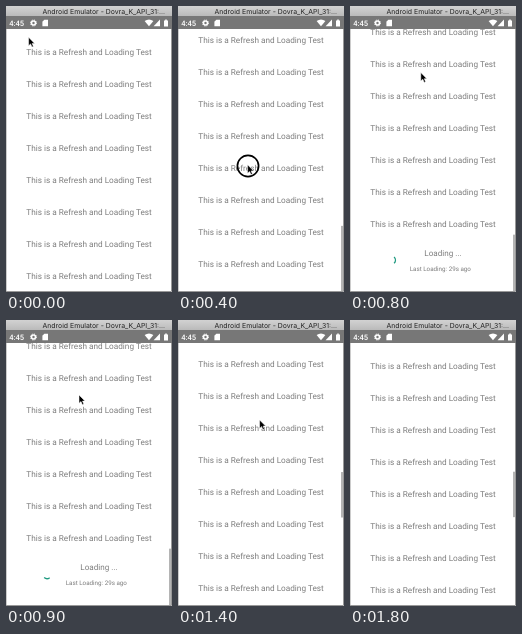
Write an HTML page that moves like this. It is 166 by 286 pixels and loops after 2000 ms.

```html
<!DOCTYPE html>
<html lang="en">
<head>
<meta charset="utf-8">
<title>Refresh and loading list</title>
<style>
  html, body { margin: 0; width: 100%; height: 100%; overflow: hidden; background: #fff; }
  svg { display: block; width: 166px; height: 286px; }
  text { font-family: Roboto, sans-serif; text-anchor: middle; fill: #7d7d7d; text-rendering: geometricPrecision; }
  .row { font-size: 8.22px; }
  .state { font-size: 8.1px; }
  .note { font-size: 6.25px; }
  .title { font: 6.9px Inter, sans-serif; fill: #222; }
  .clock { font-size: 7.6px; font-weight: 500; fill: #fff; }
</style>
</head>
<body>
<svg viewBox="0 0 166 286">
  <defs>
    <linearGradient id="chrome" x2="0" y2="1">
      <stop offset="0" stop-color="#d2d2d2"/>
      <stop offset="1" stop-color="#bababa"/>
    </linearGradient>
  </defs>
  <rect width="166" height="286" fill="#fff"/>
  <g id="rows"></g>
  <g id="footer">
    <text id="state" class="state" y="3"></text>
    <text id="note" class="note" x="90.3" y="17.4"></text>
    <path id="arrow" d="M42 0V12.8M38.5 9.3L42 12.8L45.5 9.3" fill="none" stroke="#777" stroke-width=".9"/>
    <path id="spinner" fill="none" stroke-width="1.4"/>
  </g>
  <rect id="thumb" x="163" width="2" fill="#b4b4b4"/>
  <path d="M.25 23V286" stroke="#777" stroke-width=".5"/>
  <path d="M165.5 23V285.5H0" fill="none" stroke="#999"/>

  <rect width="166" height="10" fill="url(#chrome)"/>
  <text class="title" x="97.8" y="7.6">Android Emulator - Dovra_K_API_31:...</text>
  <rect y="10" width="166" height="13" fill="#777"/>
  <text class="clock" x="10.7" y="19.8">4:45</text>
  <g fill="#fff">
    <circle cx="27.5" cy="17" r="2" fill="none" stroke="#fff" stroke-width="1.6"/>
    <circle cx="27.5" cy="17" r="3" fill="none" stroke="#fff" stroke-width="1" stroke-dasharray="1.2 1.156"/>
    <path d="M38.3 13.8H42V20.2H36.4V15.8Z"/>
    <path d="M138.6 15Q143 11.8 147.4 15L143 20.3Z"/>
    <path d="M154 13.6V20.3H147.6Z"/>
    <path d="M158 14.4H159.2V13.5H160.8V14.4H162V20.4H158Z"/>
  </g>

  <g id="pointer">
    <circle id="press" cx=".4" cy="1.2" r="10.6" fill="none" stroke="#000" stroke-width="1.7"/>
    <path d="M0 0V8.4L2 6.6L3.4 9.8L4.8 9.1L3.5 6.1H6Z" fill="#000" stroke="#fff" stroke-width=".5"/>
  </g>
</svg>
<script>
const $ = id => document.getElementById(id);
const LOOP = 2000, STEP = 100, LAST_STEP = 18;
const PITCH = 32, FIRST_Y = 46, TOP = 24, VIEW = 262;
const END = 736, COUNT = 31, ADDED = 16;

// Keys: [step, value...]
const scrollKeys = [[0, 0], [1, 0], [2, 420], [3, END], [4, 748], [5, 778], [6, 808],
  [7, 794], [8, 788], [11, 788], [12, 777], [13, 745], [14, 738], [15, END]];
const pointerKeys = [[0, 22.6, 31.3], [2, 55, 185], [3, 66, 195], [4, 69.6, 158.8],
  [6, 75.6, 57.3], [8, 70.8, 66.6], [12, 79.6, 100], [15, 82.6, 100]];

function at(keys, step, field = 1) {
  const i = keys.findIndex(k => k[0] >= step);
  if (i < 0) return keys[keys.length - 1][field];
  if (i === 0) return keys[0][field];
  const a = keys[i - 1], b = keys[i];
  return a[field] + (b[field] - a[field]) * (step - a[0]) / (b[0] - a[0]);
}

const show = (el, on) => el.setAttribute("visibility", on ? "visible" : "hidden");

function arc(cx, cy, r, from, to) {
  const point = deg => {
    const a = deg * Math.PI / 180;
    return `${cx + r * Math.cos(a)} ${cy + r * Math.sin(a)}`;
  };
  return `M${point(from)}A${r} ${r} 0 0 1 ${point(to)}`;
}

const rows = Array.from({ length: 9 }, () => {
  const t = document.createElementNS("http://www.w3.org/2000/svg", "text");
  t.setAttribute("class", "row");
  t.setAttribute("x", 83);
  t.textContent = "This is a Refresh and Loading Test";
  return $("rows").appendChild(t);
});

function drawList(scroll, count) {
  const first = Math.floor(scroll / PITCH);
  rows.forEach((row, i) => {
    const n = first + i;
    row.setAttribute("y", FIRST_Y + 3 + n * PITCH - scroll);
    show(row, n < count);
  });
}

function drawFooter(step, scroll) {
  const loading = step >= 7;
  const y = FIRST_Y + (COUNT - 1) * PITCH - scroll + 29.2;
  show($("footer"), step < 13 && y < 286);
  $("footer").setAttribute("transform", `translate(0 ${y})`);
  $("state").textContent = loading ? "Loading ..." : "Release to load";
  $("state").setAttribute("x", loading ? 93 : 92);
  $("note").textContent = `Last Loading: ${step < 8 ? 28 : 29}s ago`;
  $("arrow").style.display = loading ? "none" : "";
  $("spinner").style.display = loading ? "" : "none";
  const fade = Math.max(0, Math.min(1, (step - 8) / 4));
  const turn = (step - 8) * 90;
  $("spinner").setAttribute("d", arc(41, 7, 4.4, turn - 45 + 30 * fade, turn + 45 - 20 * fade));
  $("spinner").setAttribute("stroke", step < 12 ? "#1f9a80" : "#44504d");
}

function drawThumb(step, scroll, count) {
  const content = END + VIEW + (count - COUNT) * PITCH;
  const over = count > COUNT ? 0 : Math.max(0, scroll - END);
  const height = VIEW * VIEW / content - over * 0.22;
  const y = Math.min(TOP + scroll * VIEW / content, TOP + VIEW - height);
  $("thumb").setAttribute("y", y);
  $("thumb").setAttribute("height", height);
  show($("thumb"), step >= 2);
}

function drawPointer(step) {
  const x = at(pointerKeys, step), y = at(pointerKeys, step, 2);
  $("pointer").setAttribute("transform", `translate(${x} ${y})`);
  $("pointer").style.display = step < 17 ? "" : "none";
  show($("press"), step >= 3 && step <= 6);
}

function draw(ms) {
  const step = Math.min(LAST_STEP, Math.floor(ms % LOOP / STEP));
  const scroll = at(scrollKeys, step);
  const count = step >= 13 ? COUNT + ADDED : COUNT;
  drawList(scroll, count);
  drawFooter(step, scroll);
  drawThumb(step, scroll, count);
  drawPointer(step);
}

const start = performance.now();
function tick() {
  draw(performance.now() - start);
  requestAnimationFrame(tick);
}
tick();
</script>
</body>
</html>
```
